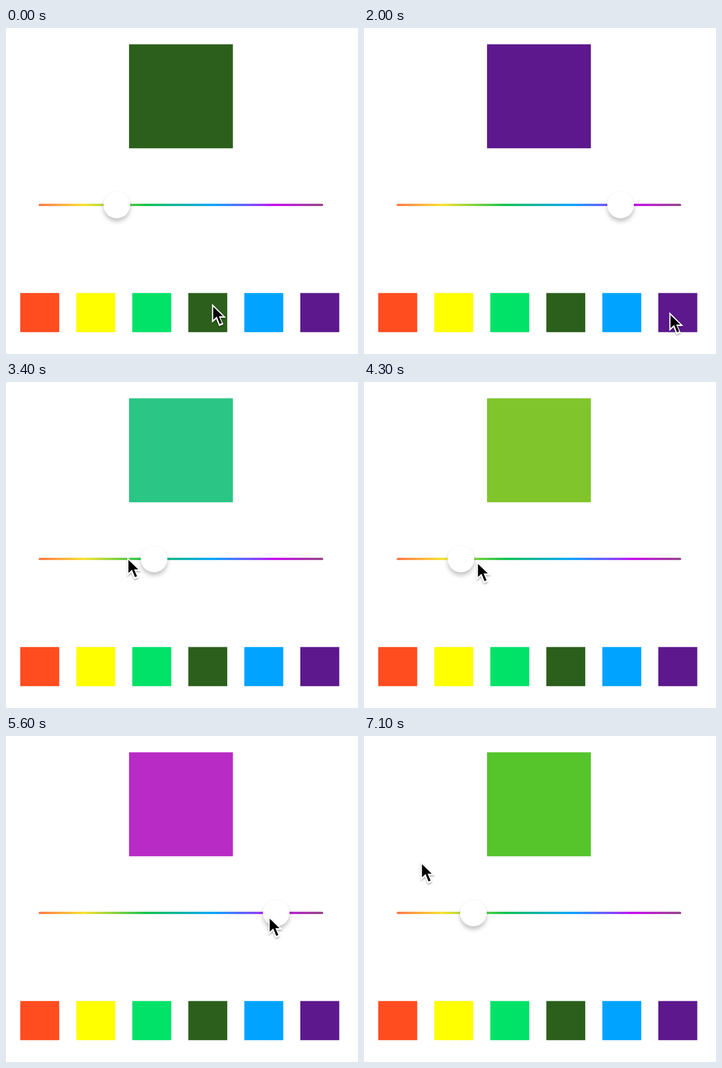
An HTML page that plays this animation: 592 px wide and 548 px high, repeating every 7200 ms.

```html
<!DOCTYPE html>
<html lang="en">
<head>
<meta charset="utf-8">
<title>Colour slider</title>
<style>
html, body { margin: 0; width: 100%; height: 100%; overflow: hidden; background: #fff; }
svg { display: block; width: 592px; height: 548px; }
</style>
</head>
<body>
<svg viewBox="0 0 592 548">
  <defs>
    <linearGradient id="spectrum" gradientUnits="userSpaceOnUse" x1="55" y1="0" x2="533.5" y2="0">
      <stop offset="0" stop-color="#ff7040"/>
      <stop offset=".16" stop-color="#f7e028"/>
      <stop offset=".38" stop-color="#06c044"/>
      <stop offset=".615" stop-color="#00a0ff"/>
      <stop offset=".74" stop-color="#6a4cff"/>
      <stop offset=".83" stop-color="#c800f0"/>
      <stop offset="1" stop-color="#904080"/>
    </linearGradient>
    <filter id="knobShadow" x="-50%" y="-50%" width="200%" height="200%">
      <feDropShadow dx="0" dy="5.5" stdDeviation="3.8" flood-opacity=".23"/>
    </filter>
    <filter id="cursorShadow" x="-50%" y="-50%" width="200%" height="200%">
      <feDropShadow dx="0" dy="2" stdDeviation="1.5" flood-opacity=".35"/>
    </filter>
  </defs>
  <rect id="preview" x="206.9" y="27.4" width="174.7" height="174.8"/>
  <rect x="55" y="295.4" width="478.5" height="3.9" rx="1.9" fill="url(#spectrum)"/>
  <g id="knob" filter="url(#knobShadow)">
    <circle r="22.4" fill="#fff" stroke="#000" stroke-opacity=".05" stroke-width=".6"/>
  </g>
  <g id="swatches"></g>
  <g id="cursor" filter="url(#cursorShadow)">
    <path fill="#fff" d="M0 0V32L7 25.5L12 37.5L19 34.5L14 23.5H23.5Z"/>
    <path d="M2 5V27L8 21.5L13 34L16.5 32.5L11.5 21H18.5Z"/>
  </g>
</svg>
<script>
const LOOP = 7200, STEP = 100;
const PICK_BLUE = 1300, PICK_PURPLE = 2000, GRAB = 2900, LEAVE = 7100;
const $ = id => document.getElementById(id);
const colors = ['#ff4d1f', '#ffff00', '#00e268', '#2b5f1b', '#00a3ff', '#5c188c'];
const [, , , darkGreen, blue, purple] = colors;

$('swatches').innerHTML = colors.map((color, i) =>
  `<rect x="${24 + i * 94.2}" y="445.5" width="65.5" height="65.8" fill="${color}"/>`).join('');

// Smooth curve through [input, value] points, with level ends.
function curve(points, at) {
  const last = points.length - 1;
  if (at <= points[0][0]) return points[0][1];
  if (at >= points[last][0]) return points[last][1];
  const i = points.findIndex(point => point[0] > at) - 1;
  const slope = k => k <= 0 || k >= last ? 0 :
    (points[k + 1][1] - points[k - 1][1]) / (points[k + 1][0] - points[k - 1][0]);
  const [a, from] = points[i], [b, to] = points[i + 1];
  const span = b - a, u = (at - a) / span, ease = u * u * (3 - 2 * u);
  return from + (to - from) * ease +
    span * u * (1 - u) * (slope(i) * (1 - u) - slope(i + 1) * u);
}

// Knob position over the back-and-forth drag.
const drag = [
  [GRAB, 431.5], [3400, 249], [3800, 89], [4300, 163], [4800, 325.5],
  [5400, 499], [5600, 454.5], [5700, 442], [6150, 78], [6700, 184]
];
const hueAt = [[78, 25], [163, 87], [249, 155], [325.5, 198], [454.5, 295.3], [511, 328]];

function knobX(t) {
  if (t < PICK_BLUE) return 186.3;
  if (t < PICK_PURPLE) return 322;
  return curve(drag, t);
}

function previewColor(t, x) {
  if (t < PICK_BLUE) return darkGreen;
  if (t < PICK_PURPLE) return blue;
  if (t <= GRAB) return purple;
  return `hsl(${curve(hueAt, x)} 64% 47%)`;
}

function glide(t, start, end) {
  const u = Math.min(1, Math.max(0, (t - start) / (end - start)));
  return u * u * (3 - 2 * u);
}

// While dragging, the pointer runs one step ahead of the knob.
function pointer(t) {
  if (t >= LEAVE) return [95.5, 210.5];
  if (t >= GRAB) return [
    curve(drag, t + STEP) - .5,
    298 - 4 * Math.cos((t - 3400) / 1440 * 2 * Math.PI)
  ];
  const toBlue = glide(t, 400, 1000), toPurple = glide(t, 1200, 1800), toKnob = glide(t, 2100, GRAB);
  return [
    346.5 + 83 * toBlue + 84 * toPurple - 83 * toKnob,
    463.5 + 14 * toBlue - 178 * toKnob
  ];
}

function render(time) {
  const t = Math.floor(time % LOOP / STEP) * STEP;
  const x = knobX(t);
  $('preview').setAttribute('fill', previewColor(t, x));
  $('knob').setAttribute('transform', `translate(${x} 297.3)`);
  $('cursor').setAttribute('transform', `translate(${pointer(t)})`);
}

const start = performance.now();
function tick() {
  render(performance.now() - start);
  requestAnimationFrame(tick);
}
tick();
</script>
</body>
</html>
```
